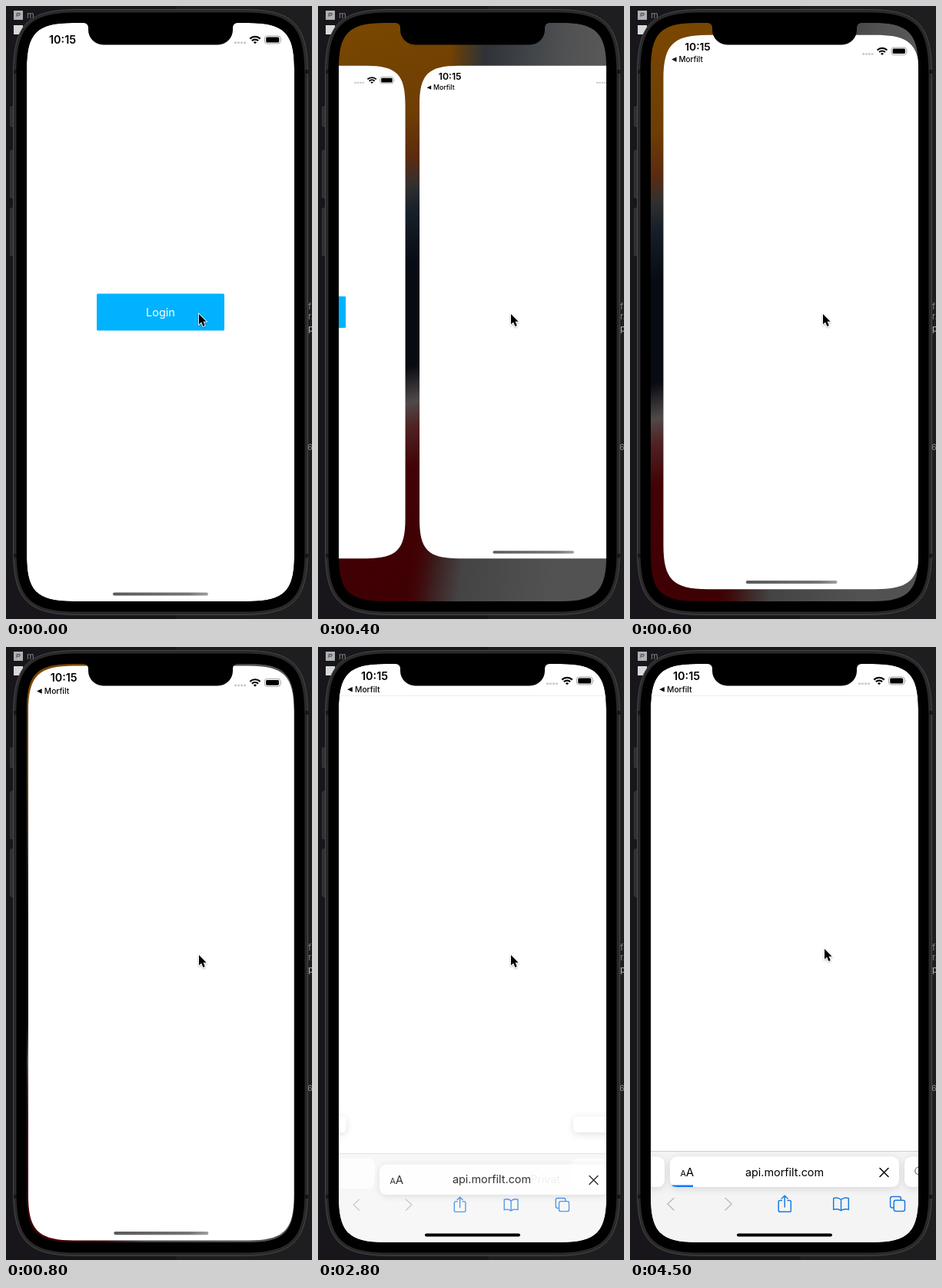
Animation, 398 px wide and 798 px high, one loop 5000 ms. Source, as an HTML page:

```html
<!DOCTYPE html>
<html lang="en">
<head>
<meta charset="utf-8">
<title>Login flow</title>
<style>
  html, body { margin: 0; width: 100%; height: 100%; overflow: hidden; background: #19171b; }
  svg { display: block; width: 100vw; height: 100vh; }
  text { font-family: Inter, "Open Sans", sans-serif; }
  .line { fill: none; stroke-width: 1.5; stroke-linecap: round; stroke-linejoin: round; }
</style>
</head>
<body>
<svg viewBox="0 0 398 798" xmlns="http://www.w3.org/2000/svg">
  <defs>
    <clipPath id="screenClip"><path id="screenShape"/></clipPath>
    <linearGradient id="homeGray">
      <stop stop-color="#5a5a5a"/><stop offset=".8" stop-color="#757575"/><stop offset="1" stop-color="#a0a0a0"/>
    </linearGradient>
    <linearGradient id="wallBands" gradientUnits="userSpaceOnUse" x1="80" y1="22" x2="80" y2="775">
      <stop stop-color="#794700"/>
      <stop offset=".17" stop-color="#6e3d04"/>
      <stop offset=".24" stop-color="#5c2b10"/>
      <stop offset=".285" stop-color="#33302f"/>
      <stop offset=".33" stop-color="#17202a"/>
      <stop offset=".42" stop-color="#070b13"/>
      <stop offset=".59" stop-color="#080b11"/>
      <stop offset=".65" stop-color="#50494a"/>
      <stop offset=".69" stop-color="#502324"/>
      <stop offset=".76" stop-color="#430205"/>
      <stop offset="1" stop-color="#3e0003"/>
    </linearGradient>
    <linearGradient id="wallTop" gradientUnits="userSpaceOnUse" x1="175" y1="0" x2="375" y2="20">
      <stop stop-color="#5f3d10" stop-opacity="0"/>
      <stop offset=".1" stop-color="#563a16"/>
      <stop offset=".24" stop-color="#2f3338"/>
      <stop offset=".5" stop-color="#3f4347"/>
      <stop offset=".75" stop-color="#505152"/>
      <stop offset="1" stop-color="#585858"/>
    </linearGradient>
    <linearGradient id="wallBottom" gradientUnits="userSpaceOnUse" x1="115" y1="740" x2="300" y2="770">
      <stop stop-color="#430205" stop-opacity="0"/>
      <stop offset=".18" stop-color="#3c1c1d"/>
      <stop offset=".38" stop-color="#454444"/>
      <stop offset="1" stop-color="#525252"/>
    </linearGradient>
    <filter id="soft" x="-30%" y="-80%" width="160%" height="260%">
      <feDropShadow dx="0" dy="2" stdDeviation="5" flood-color="#000" flood-opacity=".13"/>
    </filter>
    <filter id="cursorShade" x="-50%" y="-30%" width="220%" height="180%">
      <feDropShadow dx="0" dy="1" stdDeviation=".8" flood-color="#000" flood-opacity=".35"/>
    </filter>

    <g id="statusIcons">
      <g fill="#c5c5c5">
        <rect x="297" y="46.5" width="3" height="2.5" rx="1"/><rect x="301" y="46.5" width="3" height="2.5" rx="1"/>
        <rect x="305" y="46.5" width="3" height="2.5" rx="1"/><rect x="309" y="46.5" width="3" height="2.5" rx="1"/>
      </g>
      <g fill="none" stroke="#000" stroke-width="2.2">
        <path d="M317.3 42.6A9.6 9.6 0 0 1 330.7 42.6"/>
        <path d="M319.9 45.3A5.9 5.9 0 0 1 328.1 45.3"/>
      </g>
      <path d="M324 49.3L321.9 47.2A3 3 0 0 1 326.1 47.2Z"/>
      <rect x="336.5" y="39" width="20.5" height="10" rx="3" fill="none" stroke="#a3a3a3"/>
      <rect x="338.2" y="40.6" width="17" height="6.8" rx="1.5"/>
      <path d="M358.2 42.4Q359.7 44 358.2 45.6Z" fill="#999"/>
    </g>
    <g id="page">
      <path id="pageShape" fill="#fff"/>
      <use href="#statusIcons"/>
      <rect x="139" y="763.4" width="124" height="4.2" rx="2.1" fill="url(#homeGray)"/>
    </g>
    <g id="toolIcons" class="line" stroke="#1a7be0">
      <g stroke="#bcbcbc"><path d="M57 717.5L48.8 725L57 733"/><path d="M124 717.5L132.2 725L124 733"/></g>
      <path d="M197.5 720.5H195Q193.2 720.5 193.2 722.3V733.5Q193.2 735.3 195 735.3H207.5Q209.3 735.3 209.3 733.5V722.3Q209.3 720.5 207.5 720.5H205M201.2 729V714.5M197.3 718L201.2 714.2L205.1 718"/>
      <path d="M274.5 719.5Q270 715.6 264.7 717.8V732.4Q270 730.6 274.5 733.6Q279 730.6 284.3 732.4V717.8Q279 715.6 274.5 719.5V733"/>
      <path d="M343 730H341Q338.6 730 338.6 727.6V718Q338.6 715.6 341 715.6H350Q352.4 715.6 352.4 718V720"/>
      <rect x="343.2" y="720.2" width="14.3" height="14.3" rx="2.4"/>
    </g>
    <g id="addressBar">
      <rect x="52" y="663.5" width="298" height="39.5" rx="9.5" fill="#fff" filter="url(#soft)"/>
      <text x="65.5" y="689" font-size="10.8">A</text>
      <text x="72.8" y="689" font-size="15">A</text>
      <path class="line" stroke="#000" d="M325 678.5L336 689.5M336 678.5L325 689.5"/>
    </g>
    <text id="address" x="201" y="688.8" font-size="14.4" text-anchor="middle">api.morfilt.com</text>
  </defs>

  <rect width="398" height="798" fill="#19161b"/>
  <path d="M222 0H398V798H222Z" fill="#1e1e20"/>
  <rect x="10" y="6" width="12" height="12" fill="#aeb2b2"/>
  <path d="M14 14V9.5H18V12H14" fill="none" stroke="#4a4a4a"/>
  <rect x="10" y="25" width="12" height="12" fill="#d8d8d8"/>
  <g fill="#858585" font-size="11">
    <text x="27" y="16">m</text>
    <text x="393" y="395">f</text><text x="393" y="408">r.</text>
    <text x="393" y="424" fill="#bbb">p</text><text x="392" y="578">6</text>
  </g>
  <g fill="#303032" stroke="#444" stroke-width=".6">
    <rect x="5.5" y="131" width="6" height="26" rx="1.5"/>
    <rect x="5.5" y="188" width="6" height="62" rx="1.5"/>
    <rect x="5.5" y="263" width="6" height="62" rx="1.5"/>
  </g>
  <path id="bodyShape" fill="#29292a" stroke="#474747"/>
  <g fill="#161616">
    <rect x="10" y="83" width="4" height="5"/><rect x="389" y="83" width="4" height="5"/>
    <rect x="10" y="713" width="4" height="5"/><rect x="389" y="713" width="4" height="5"/>
  </g>
  <path id="bezelShape"/>

  <g clip-path="url(#screenClip)">
    <g id="wallpaper">
      <g transform="rotate(-14 123 398)"><rect x="-200" y="-160" width="800" height="1120" fill="url(#wallBands)"/></g>
      <rect x="175" y="22" width="200" height="378" fill="url(#wallTop)"/>
      <rect x="115" y="400" width="260" height="375" fill="url(#wallBottom)"/>
    </g>
    <g id="loginCard">
      <use href="#page"/>
      <text x="56" y="49" font-size="14.4" font-weight="600">10:15</text>
      <rect x="118" y="374.5" width="166" height="48" rx="1.5" fill="#00b2ff"/>
      <text x="201" y="403.8" font-size="14.5" text-anchor="middle" fill="#fff">Login</text>
    </g>
    <g id="browserCard">
      <use href="#page"/>
      <text x="56" y="43" font-size="14.4" font-weight="600">10:15</text>
      <path d="M38.2 55.2L44.8 52V58.4Z"/>
      <text x="48" y="59" font-size="10.3" font-weight="500">Morfilt</text>
    </g>
    <path id="topRule" d="M27 63.5H375" stroke="#ededed"/>

    <g id="entering">
      <g fill="#fff" filter="url(#soft)">
        <rect x="-10" y="611" width="47" height="21" rx="7"/><rect x="332" y="611" width="80" height="21" rx="7"/>
      </g>
      <rect x="27" y="659" width="348" height="116" fill="#f7f7f7"/>
      <path d="M27 659.5H375" stroke="#e4e4e4"/>
      <rect x="10" y="665.5" width="64" height="39.5" rx="9" fill="#fdfdfd"/>
      <rect x="329" y="665.5" width="70" height="39.5" rx="9" fill="#fdfdfd"/>
      <use href="#toolIcons" transform="translate(50 726) scale(.908) translate(-53 -725)" opacity=".75"/>
      <use href="#addressBar" transform="translate(28 10)" opacity=".8"/>
      <text x="276" y="697.5" font-size="14.4" fill="#f0f0f0">Privat</text>
      <use href="#address" transform="translate(25 9.5)" opacity=".8"/>
    </g>

    <g id="settled">
      <rect x="27" y="656" width="348" height="119" fill="#f4f4f4"/>
      <path d="M27 656.5H375" stroke="#cfcfcf"/>
      <g fill="#fff" filter="url(#soft)">
        <rect x="-20" y="663.5" width="65" height="39.5" rx="9.5"/><rect x="357" y="663.5" width="70" height="39.5" rx="9.5"/>
      </g>
      <circle cx="375.5" cy="682" r="4.7" class="line" stroke="#888"/>
      <use href="#addressBar"/>
      <use href="#address"/>
      <path id="progress" fill="#0a7aff"/>
      <use href="#toolIcons"/>
    </g>
    <rect id="homeBlack" x="139" y="763.4" width="124" height="4.2" rx="2.1"/>
  </g>
  <path d="M101 21.5V22A6 6 0 0 1 107 28V31A19.5 19.5 0 0 0 126.5 50.5H275.5A19.5 19.5 0 0 0 295 31V28A6 6 0 0 1 301 22V21.5Z"/>
  <path id="cursor" d="M0 0V13.4L3.1 10.6L5.4 16L7.8 15L5.6 9.8H9.6Z" stroke="#fff" stroke-width="1.6" paint-order="stroke" filter="url(#cursorShade)"/>
</svg>
<script>
const LOOP = 5000, STEP = 100;
const CENTER = { x: 201, y: 398.5 }, WIDTH = 348, HEIGHT = 753, GAP = 18.5;
const el = id => document.getElementById(id);
const show = (id, on) => el(id).setAttribute('display', on ? 'inline' : 'none');
const clamp = v => Math.max(0, Math.min(1, v));

// Rectangle around the screen, grown by a margin, with continuous-curvature corners.
function squircle(id, margin) {
  const w = WIDTH + 2 * margin, h = HEIGHT + 2 * margin;
  const reach = 1.42 * (42.2 + margin), pull = .22 * reach;
  const x = CENTER.x - w / 2, y = CENTER.y - h / 2;
  el(id).setAttribute('d', `M${x + reach} ${y}h${w - 2 * reach}
    c${reach - pull} 0 ${reach} ${pull} ${reach} ${reach}v${h - 2 * reach}
    c0 ${reach - pull} ${-pull} ${reach} ${-reach} ${reach}h${2 * reach - w}
    c${pull - reach} 0 ${-reach} ${-pull} ${-reach} ${-reach}v${2 * reach - h}
    c0 ${pull - reach} ${pull} ${-reach} ${reach} ${-reach}z`);
}
squircle('screenShape', 0);
squircle('pageShape', 0);
squircle('bezelShape', 13.5);
squircle('bodyShape', 17.5);

function placeCard(id, x, scale) {
  el(id).setAttribute('transform',
    `translate(${x} ${CENTER.y}) scale(${scale}) translate(${-CENTER.x} ${-CENTER.y})`);
}

// Critically damped slide between apps while both cards dip in size.
function switchApps(t) {
  const dip = Math.max(0, t - 200) / 1000, slide = 14.2 * Math.max(0, t - 211) / 1000;
  const done = t >= 1200;
  const left = done ? 0 : (1 + slide) * Math.exp(-slide);
  const scale = done ? 1 : 1 - 52.5 * dip * dip * Math.exp(-13.25 * dip);
  const pitch = WIDTH * scale + GAP;
  placeCard('loginCard', CENTER.x - (1 - left) * pitch, scale);
  placeCard('browserCard', CENTER.x + left * pitch, scale);
  show('wallpaper', t >= 300 && !done);
  show('loginCard', !done);
  show('browserCard', t >= 300);
}

function render(time) {
  const t = Math.floor((time % LOOP) / STEP) * STEP;
  switchApps(t);
  show('topRule', t >= 2800);
  show('homeBlack', t >= 2800);
  show('entering', t >= 2800 && t < 3200);
  show('settled', t >= 3200);

  const end = 76 + 6 * clamp((t - 3300) / 200);
  el('progress').setAttribute('d', `M54 700.5H${end}V703H61Q56 703 54 700.5Z`);

  const move = clamp((t - 4200) / 300);
  el('cursor').setAttribute('transform', `translate(${251 + 2 * move} ${401 - 8 * move})`);
}

const start = performance.now();
function tick() {
  render(performance.now() - start);
  requestAnimationFrame(tick);
}
tick();
</script>
</body>
</html>
```
